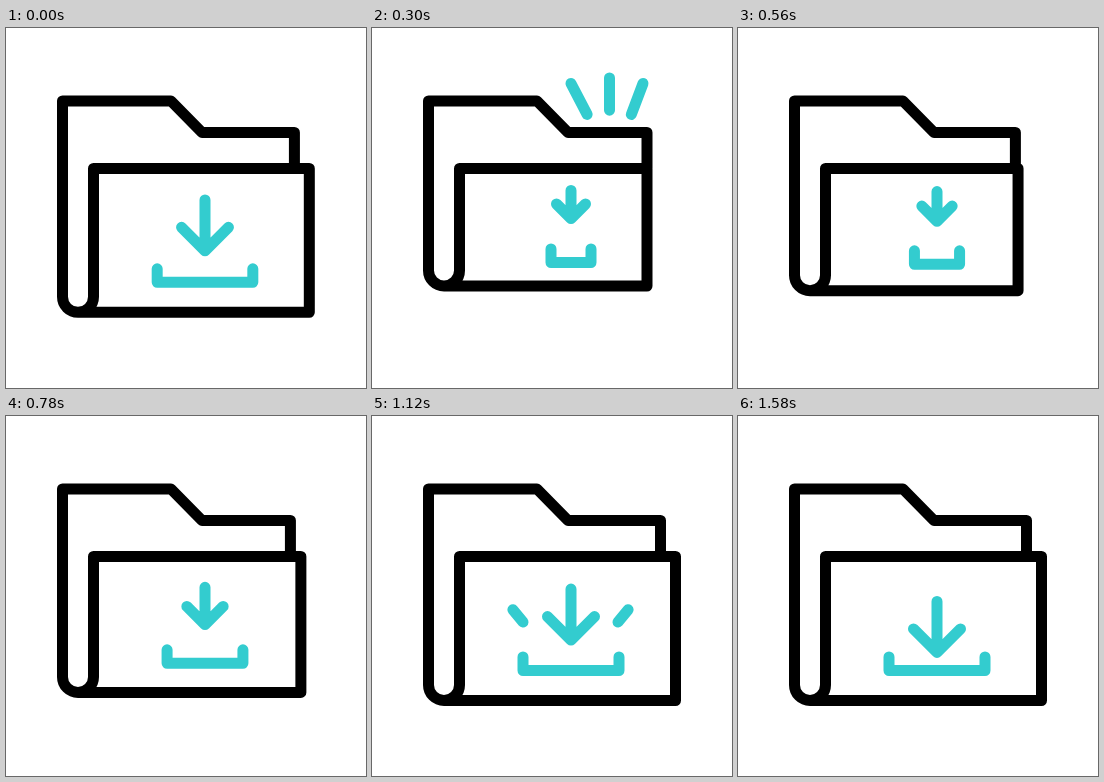
Animation of 360x360 px, one loop 2400 ms. Source, as an HTML page:

```html
<!DOCTYPE html>
<html lang="en">
<head>
<meta charset="utf-8">
<title>Folder download</title>
<style>
  html, body { margin: 0; height: 100%; overflow: hidden; background: #fff; }
  svg { display: block; width: 100vw; height: 100vh; }
  path { fill: none; stroke: #000; stroke-width: 11; stroke-linecap: round; stroke-linejoin: round; }
  .accent { stroke: #33cccf; }
</style>
</head>
<body>
<svg viewBox="0 0 360 360">
  <path id="folder"/>
  <path id="tray" class="accent"/>
  <path id="arrow" class="accent"/>
  <path id="rays" class="accent"/>
</svg>
<script>
const LOOP = 2400;
const span = (t, from, to) => Math.min(1, Math.max(0, (t - from) / (to - from)));
const smooth = p => p * p * (3 - 2 * p);
const easeIn = p => p * p;
const easeOut = p => p * (2 - p);
const mix = (a, b, p) => a + (b - a) * p;
const setPath = (id, d) => document.getElementById(id).setAttribute('d', d);

// Each ray is [x1, y1, x2, y2], drawn outwards and then wiped from its root.
const bursts = [
  { grow: [100, 260], wipe: [280, 480],
    rays: [[217, 90, 199, 55.5], [237.5, 86, 237.5, 50], [258, 90, 271, 55.5]] },
  { grow: [1040, 1200], wipe: [1180, 1400],
    rays: [[151, 206, 131, 182], [246, 206, 266, 182]] }
];

function burstPath({ grow, wipe, rays }, t) {
  const head = span(t, ...grow), tail = span(t, ...wipe);
  if (head <= tail) return '';
  return rays.map(([x1, y1, x2, y2]) =>
    `M${mix(x1, x2, tail)} ${mix(y1, y2, tail)}L${mix(x1, x2, head)} ${mix(y1, y2, head)}`
  ).join('');
}

function draw(t) {
  const shrink = easeOut(span(t, 0, 300));
  const folder = shrink - smooth(span(t, 400, 1000));
  const tray = shrink - smooth(span(t, 460, 1000));
  const arrow = shrink - easeIn(span(t, 400, 1000));

  const right = mix(303.5, 275, folder);
  const bottom = mix(284.5, 258, folder);
  const back = mix(288.5, 275, folder);
  const fold = bottom - 15.5;
  setPath('folder',
    `M${back} 140V104.5H196L165 73H56.5V${fold}A15.5 15.5 0 0 0 87.5 ${fold}` +
    `V140.5H${right}V${bottom}H72`);

  const half = mix(48, 20, tray);
  const base = mix(254.5, 234.5, tray);
  setPath('tray', `M${199 - half} ${base - 13.5}V${base}H${199 + half}V${base - 13.5}`);

  const center = mix(197.5, 176.5, tray) + 13.5 * smooth(span(t, 1020, 1600));
  const reach = mix(25.5, 14, arrow);
  const wing = mix(23.5, 14.5, arrow);
  const tip = center + reach;
  setPath('arrow',
    `M199 ${center - reach}V${tip}M${199 - wing} ${tip - wing}L199 ${tip}L${199 + wing} ${tip - wing}`);

  setPath('rays', bursts.map(b => burstPath(b, t)).join(''));
}

const start = performance.now();
function tick() {
  // Motion rests from 1580 ms until the loop restarts.
  draw(Math.min((performance.now() - start) % LOOP, 1580));
  requestAnimationFrame(tick);
}
tick();
</script>
</body>
</html>
```
